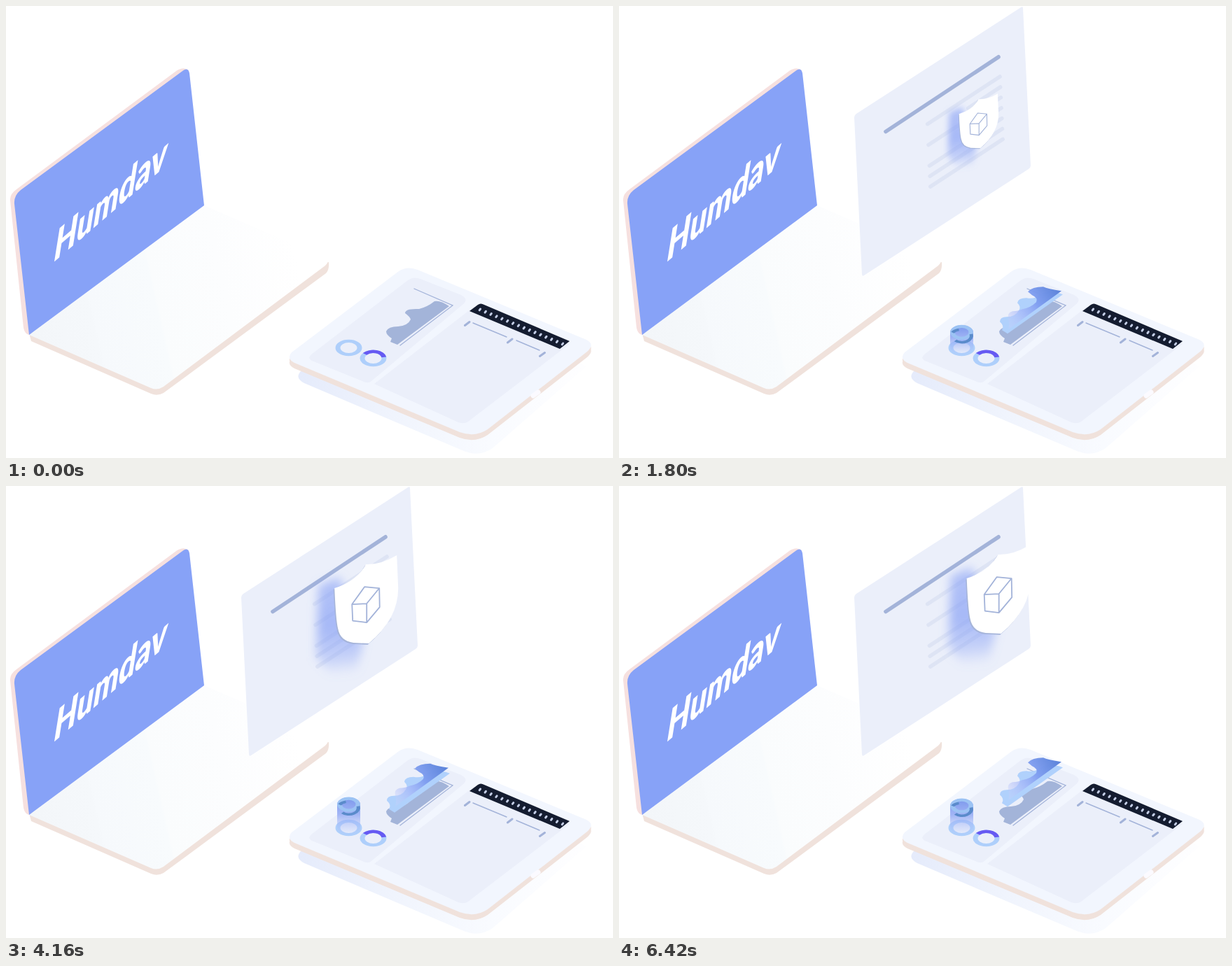
Write an HTML page that moves like this. It is 867 px wide and 646 px high and loops after 6.46 s.

```html
<!DOCTYPE html>
<html lang="en">
<head>
<meta charset="utf-8">
<title>Laptop and tablet</title>
<style>
html, body { margin: 0; width: 100%; height: 100%; overflow: hidden; background: #fff; }
svg { display: block; width: 100%; height: 100%; }
.line { fill: none; stroke: #a3b3d9; stroke-linecap: round; }
</style>
</head>
<body>
<svg viewBox="0 0 867 646">
  <defs>
    <linearGradient id="deck" gradientUnits="userSpaceOnUse" x1="40" y1="470" x2="420" y2="385">
      <stop offset="0" stop-color="#f3f6f9"/>
      <stop offset=".22" stop-color="#f5f8fb"/>
      <stop offset=".23" stop-color="#f6f9fc"/>
      <stop offset=".46" stop-color="#f8fbfd"/>
      <stop offset=".47" stop-color="#fafcfd"/>
      <stop offset=".72" stop-color="#fcfdfe"/>
      <stop offset="1" stop-color="#fff"/>
    </linearGradient>
    <linearGradient id="ground" gradientUnits="userSpaceOnUse" x1="420" y1="520" x2="820" y2="560">
      <stop offset="0" stop-color="#e5ebfb"/>
      <stop offset=".35" stop-color="#f0f4fd"/>
      <stop offset=".7" stop-color="#f9fbff"/>
      <stop offset="1" stop-color="#fefeff"/>
    </linearGradient>
    <linearGradient id="crest" gradientUnits="userSpaceOnUse" x1="622" y1="396" x2="552" y2="444">
      <stop offset="0" stop-color="#5f86dc"/>
      <stop offset=".4" stop-color="#7f9df0" stop-opacity=".95"/>
      <stop offset=".7" stop-color="#a5b6f8" stop-opacity=".7"/>
      <stop offset="1" stop-color="#c8cffa" stop-opacity=".3"/>
    </linearGradient>
    <linearGradient id="tube" x1="0" y1="0" x2="0" y2="1">
      <stop offset="0" stop-color="#7391ea" stop-opacity=".95"/>
      <stop offset=".45" stop-color="#8fa6f4" stop-opacity=".8"/>
      <stop offset="1" stop-color="#b4c6fb" stop-opacity=".1"/>
    </linearGradient>
    <linearGradient id="shade" gradientUnits="userSpaceOnUse" x1="478" y1="125" x2="492" y2="262">
      <stop offset="0" stop-color="#869ff5" stop-opacity=".55"/>
      <stop offset=".5" stop-color="#869ff5" stop-opacity=".68"/>
      <stop offset=".8" stop-color="#869ff5" stop-opacity=".4"/>
      <stop offset="1" stop-color="#869ff5" stop-opacity="0"/>
    </linearGradient>
    <filter id="soft" x="-50%" y="-50%" width="200%" height="200%">
      <feGaussianBlur stdDeviation="7"/>
    </filter>
    <path id="slab" d="M408 495L561 379Q573 371 588 377L829 477Q842 484 830 494L688 605Q670 617 648 609L412 510Q400 504 408 495Z"/>
    <path id="badge" d="M485 138Q516 128 530 104Q550 105 574 91L576 138Q576 182 534 217L512 216Q493 213 490 196Q487 185 485 138Z"/>
  </defs>

  <!-- laptop -->
  <path fill="#f0e2dc" d="M33 468L36 479L207 554Q216 558 225 553L457 382Q462 377 461 366Z"/>
  <path fill="url(#deck)" d="M33 470L283 285L456 360Q463 365 456 371L225 544Q216 550 207 546Z"/>
  <path fill="#f6e0df" d="M33 470Q27 469 25 460L6 278Q5 269 15 262L243 93Q253 86 261 92L60 300Z"/>
  <path fill="#87a2f7" d="M33 470L12 283Q11 271 21 263L252 93Q260 87 262 96L283 285Z"/>
  <text transform="matrix(.64 -.55 -.16 1 66 368)" fill="#fff" font-family="Lato, 'Open Sans', sans-serif" font-weight="900" font-size="66">Humdav</text>

  <!-- floating page -->
  <g id="page">
    <path fill="#ebeffa" d="M336 159Q336 156 339 154L574 2Q577 0 577 3L588 228Q588 231 585 233L350 385Q347 387 347 383Z"/>
    <path class="line" stroke-width="5.6" d="M381 179.5L542 72.8"/>
    <g id="rows" fill="none" stroke="#dee4f4" stroke-width="5.5" stroke-linecap="round"></g>
  </g>
  <g id="shield">
    <path fill="url(#shade)" filter="url(#soft)" d="M462 134L492 122L526 214L516 262L480 262L459 236Z"/>
    <use href="#badge" x="-1.5" y="1.8" fill="#a6b5da"/>
    <use href="#badge" fill="#fff"/>
    <path class="line" stroke-width="1.8" stroke-linejoin="round" d="M510 161L528 136L549 138L531 160ZL511 184.5L531 187L549.5 165L549 138M531 160V187"/>
  </g>

  <!-- tablet -->
  <path fill="url(#ground)" d="M421 522Q412 532 426 539L654 636Q676 645 695 632L829 515L700 450Z"/>
  <g fill="#f0e2dc"><use href="#slab" y="8"/><use href="#slab" y="4"/></g>
  <use href="#slab" fill="#f2f6fe"/>
  <path fill="none" stroke="#fbfaff" stroke-width="7" stroke-linecap="round" d="M753 557L760 552"/>
  <g fill="#ebeffa">
    <path d="M436 498L574 392Q582 386 592 390L650 413Q662 419 652 427L522 536Q518 540 511 537L437 507Q430 503 436 498Z"/>
    <path d="M526 540L668 430L805 483L660 594Q654 598 646 595Z"/>
  </g>
  <path fill="#141c30" d="M662 436L674 427Q678 424 683 427L805 479L791 490Z"/>
  <g id="dots" stroke="#c3cde6" stroke-width="3" stroke-linecap="round"></g>
  <path class="line" stroke-width="3" d="M655.5 456.5L662 451.5M716.5 481L723 476M762.5 500.5L769.5 495.5"/>
  <path class="line" stroke-width="1.4" d="M667 453L715 473M729 478L762 492"/>
  <path class="line" stroke-width="1.3" d="M583 404L638 428L563 485"/>
  <path fill="#a3b4d9" d="M633 429L559 484L549 480L551 475Q543 470 543 465Q546 458 560 458Q574 457 578 448Q577 444 570 439Q570 432 590 433Q602 430 612 422Q620 420 633 429Z"/>
  <g fill="none" stroke-width="7">
    <g stroke="#aecffb">
      <circle r="15.5" transform="translate(489.5 488.5) scale(1 .62)"/>
      <circle r="15.5" transform="translate(524.5 503.5) scale(1 .62)"/>
    </g>
    <path stroke="#665af2" d="M-12 -10A15.5 15.5 0 0 1 15.3 -2.5" transform="translate(524.5 503.5) scale(1 .62)"/>
  </g>

  <!-- raised charts -->
  <g id="raised">
    <path id="lower" fill="#b0d1fc" d="M634 410L555 466L547 461Q551 455 544 449Q544 442 554 442Q566 442 571 433Q575 428 569 422Q570 415 582 415Q594 417 600 411Q612 402 634 410Z"/>
    <path id="upper" fill="url(#crest)" d="M632 402L556 457Q558 450 556 442Q554 433 562 431Q570 431 576 428Q588 426 596 418Q599 412 590 408L584 403Q590 396 606 396Q612 399 632 402Z"/>
    <path id="wall" fill="url(#tube)"/>
    <g id="ring" fill="none">
      <circle r="13.2" stroke="#9cc3f4" stroke-width="6.5" transform="scale(1 .64)"/>
      <path stroke="#5a8bcb" stroke-width="5" d="M-13 -3A13.5 13.5 0 0 1 -4 -9M13.5 0A13.5 13.5 0 0 1 -9 13" transform="translate(0 2.5) scale(1 .7)"/>
    </g>
  </g>
</svg>
<script>
const LOOP = 6460, STEP = 20;
const el = id => document.getElementById(id);
const set = (id, name, value) => el(id).setAttribute(name, value);
const ramp = (t, start, length) => Math.min(1, Math.max(0, (t - start) / length));
const wave = (t, low, period) => Math.cos(2 * Math.PI * (t - low) / period);
const shift = (x, y) => `translate(${x} ${y})`;
const zoom = (x, y, s) => `${shift(x, y)} scale(${s}) ${shift(-x, -y)}`;
const show = (id, on) => set(id, 'display', on ? 'inline' : 'none');

function addPath(parent, d) {
  const path = document.createElementNS('http://www.w3.org/2000/svg', 'path');
  path.setAttribute('d', d);
  el(parent).append(path);
}

for (let i = 0; i < 7; i++) {
  const width = i === 1 || i === 3 ? 46 : 103.4;
  addPath('rows', `M${544 + .7 * i} ${101 + 14.9 * i}l${-width} ${.655 * width}`);
}
for (let i = 0; i < 16; i++) {
  addPath('dots', `M${676.2 + 7.87 * i} ${434.8 + 3.27 * i}l1.4 -1.8`);
}

function draw(t) {
  // the page grows out of the laptop screen
  show('page', t >= 40);
  set('page', 'transform', zoom(151, 285, ramp(t, 0, 980)));

  // the shield grows from the page centre and drifts along it
  const grow = ramp(t, 1180, 1000);
  const drift = -1.5 - 18.9 * wave(t, 3660, 4400);
  show('shield', grow > 0);
  set('shield', 'transform', `${zoom(462, 193.5, grow)} ${shift(drift, -.51 * drift)}`);

  // the charts lift off the tablet and bob
  const lift = grow * (30.5 - 4.5 * wave(t, 3950, 4400));
  const top = 488.5 - grow * (35.5 - 4.1 * wave(t, 3730, 2600));
  show('raised', grow > 0);
  set('raised', 'opacity', Math.min(1, grow * 3));
  set('upper', 'transform', shift(0, 27 - lift));
  set('lower', 'transform', shift(0, 19 + 8 * grow - lift));
  set('wall', 'd', `M473 ${top}V488A16.5 10 0 0 0 506 488V${top}A16.5 10 0 0 0 473 ${top}Z`);
  set('ring', 'transform', shift(489.5, top));
}

function tick() {
  const t = performance.now() % LOOP;
  draw(Math.min(Math.floor(t / STEP) * STEP, LOOP - 40));
  requestAnimationFrame(tick);
}
tick();
</script>
</body>
</html>
```
